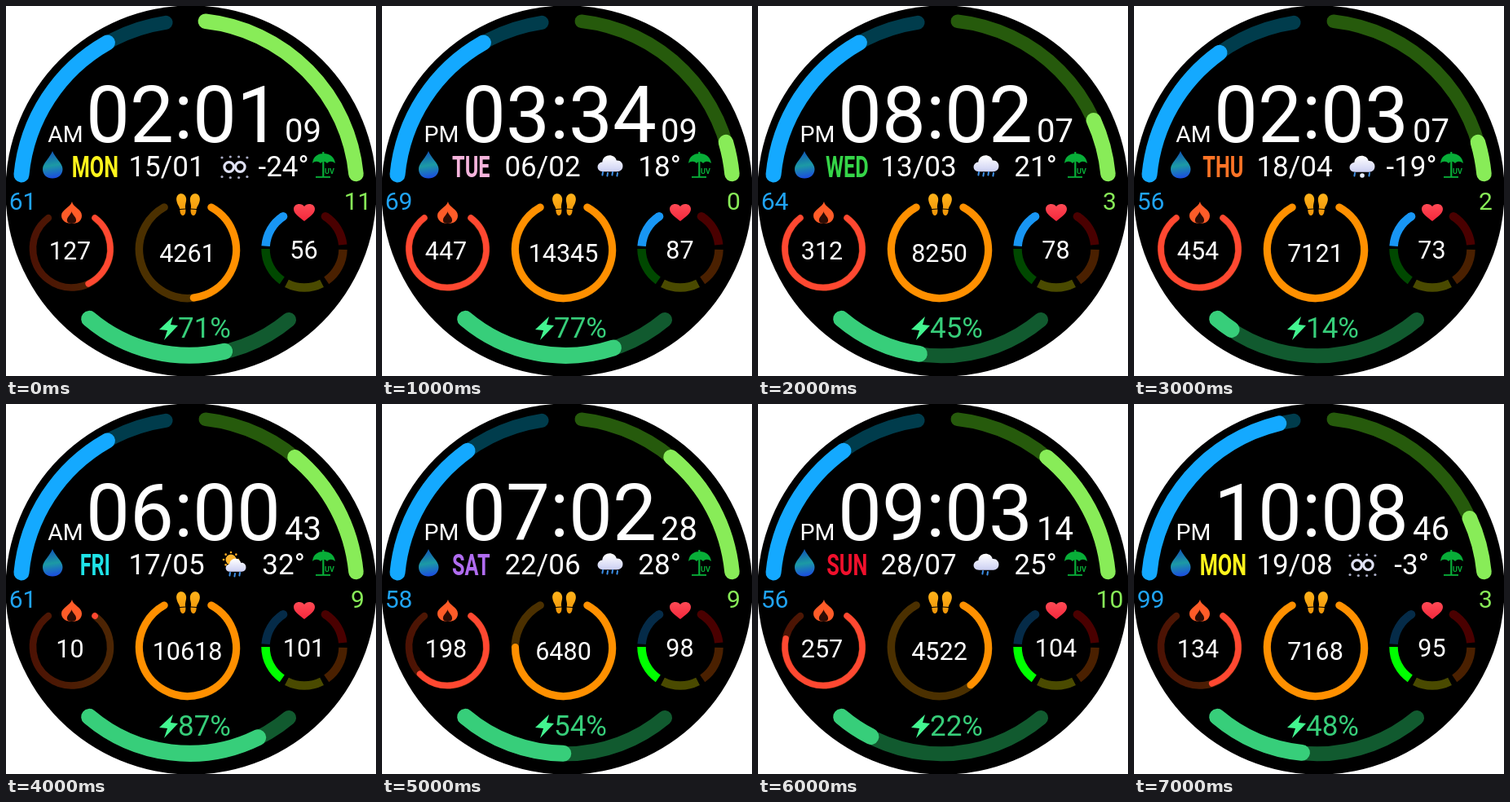
Animation of 454 by 454 pixels, one loop 8000 ms. Source, as an HTML page with a canvas:

```html
<!DOCTYPE html>
<html lang="en">
<head>
<meta charset="utf-8">
<title>Watch face</title>
<style>
html, body { margin: 0; width: 100%; height: 100%; overflow: hidden; background: #fff; }
canvas { display: block; width: 454px; height: 454px; }
</style>
</head>
<body>
<canvas id="face" width="454" height="454"></canvas>
<script>
const ctx = document.getElementById('face').getContext('2d');
const STEP = 1000;
const DAY_COLORS = {
  MON: '#fff51c', TUE: '#f5b4dc', WED: '#35d548', THU: '#ff7426',
  FRI: '#1fe3e8', SAT: '#b06cf0', SUN: '#f0102c'
};

// Ring values are fractions; the outer side arcs end at an angle in degrees.
const STATES = [
  { half: 'AM', time: '02:01', sec: '09', day: 'MON', date: '15/01', sky: 'haze', temp: '-24°',
    humid: 61, humidEnd: 240.6, uv: 11, uvEnd: -83.6, kcal: 127, kcalPart: .41, steps: 4261, stepPart: .477, pulse: 56, power: 71 },
  { half: 'PM', time: '03:34', sec: '09', day: 'TUE', date: '06/02', sky: 'rain', temp: '18°',
    humid: 69, humidEnd: 240.6, uv: 0, uvEnd: -16.5, kcal: 447, kcalPart: 1, steps: 14345, stepPart: 1, pulse: 87, power: 77 },
  { half: 'PM', time: '08:02', sec: '07', day: 'WED', date: '13/03', sky: 'rain', temp: '21°',
    humid: 64, humidEnd: 240.6, uv: 3, uvEnd: -24.4, kcal: 312, kcalPart: 1, steps: 8250, stepPart: 1, pulse: 78, power: 45 },
  { half: 'AM', time: '02:03', sec: '07', day: 'THU', date: '18/04', sky: 'sleet', temp: '-19°',
    humid: 56, humidEnd: 234.3, uv: 2, uvEnd: -16.5, kcal: 454, kcalPart: 1, steps: 7121, stepPart: 1, pulse: 73, power: 14 },
  { half: 'AM', time: '06:00', sec: '43', day: 'FRI', date: '17/05', sky: 'sun', temp: '32°',
    humid: 61, humidEnd: 240.6, uv: 9, uvEnd: -50.5, kcal: 10, kcalPart: 0, steps: 10618, stepPart: 1, pulse: 101, power: 87 },
  { half: 'PM', time: '07:02', sec: '28', day: 'SAT', date: '22/06', sky: 'rain', temp: '28°',
    humid: 58, humidEnd: 234.3, uv: 9, uvEnd: -50.5, kcal: 198, kcalPart: .66, steps: 6480, stepPart: .8, pulse: 98, power: 54 },
  { half: 'PM', time: '09:03', sec: '14', day: 'SUN', date: '28/07', sky: 'drops', temp: '25°',
    humid: 56, humidEnd: 234.3, uv: 10, uvEnd: -50.5, kcal: 257, kcalPart: .858, steps: 4522, stepPart: .369, pulse: 104, power: 22 },
  { half: 'PM', time: '10:08', sec: '46', day: 'MON', date: '19/08', sky: 'haze', temp: '-3°',
    humid: 99, humidEnd: 256.4, uv: 3, uvEnd: -24.4, kcal: 134, kcalPart: .435, steps: 7168, stepPart: 1, pulse: 95, power: 48 }
];

const rad = deg => deg * Math.PI / 180;

function arc(x, y, r, from, to, width, color, cap = 'round') {
  ctx.beginPath();
  // A tiny extra sweep keeps zero-length arcs visible as a dot.
  ctx.arc(x, y, r, rad(from), rad(to) + (from === to ? .002 : 0), to < from);
  ctx.lineWidth = width;
  ctx.lineCap = cap;
  ctx.strokeStyle = color;
  ctx.stroke();
}

function dot(x, y, r, color) {
  ctx.beginPath();
  ctx.arc(x, y, r, 0, 2 * Math.PI);
  ctx.fillStyle = color;
  ctx.fill();
}

function shape(path, color) {
  ctx.fillStyle = color;
  ctx.fill(new Path2D(path));
}

function text(str, x, y, size, color = '#fff', align = 'center') {
  ctx.font = `400 ${size}px Roboto, sans-serif`;
  ctx.textAlign = align;
  ctx.fillStyle = color;
  ctx.fillText(str, x, y);
}

function blend(x0, y0, x1, y1, ...colors) {
  const g = ctx.createLinearGradient(x0, y0, x1, y1);
  colors.forEach((c, i) => g.addColorStop(i / (colors.length - 1), c));
  return g;
}

// The colon sits a little higher than the digits' baseline.
function clock(time) {
  const [hours, minutes] = time.split(':');
  text(hours, 206, 167, 96, '#fff', 'right');
  text(':', 217.5, 162, 96);
  text(minutes, 229, 167, 96, '#fff', 'left');
}

function dayName(day) {
  ctx.save();
  ctx.translate(109.3, 210);
  ctx.scale(.7, 1); // condensed face
  ctx.font = '700 36px Roboto, sans-serif';
  ctx.textAlign = 'center';
  ctx.fillStyle = DAY_COLORS[day];
  ctx.fillText(day, 0, 0);
  ctx.restore();
}

function outerArcs(s) {
  arc(227, 227, 209, 185.5, 261.5, 17, '#003c4c');
  arc(227, 227, 209, 185.5, s.humidEnd, 19, '#14a9ff');
  arc(221.5, 226.5, 209, -5.6, -83.6, 16.5, '#265a0c');
  arc(221.5, 226.5, 209, -5.6, s.uvEnd, 18.5, '#88ec58');
  arc(225, 239, 190.3, 130.2, 50.1, 18, '#115a2f');
  arc(225, 238.5, 190.3, 130.2, 135.1 - .82 * s.power, 20, '#37ce7a');
}

function rings(s) {
  arc(80.5, 298, 47.5, -53, 233, 8.5, blend(30, 0, 130, 0, '#4c1204', '#4c2604'));
  arc(80.5, 298, 47.5, -53, -53 + 286 * s.kcalPart, 7.5, '#ff4831');
  arc(223, 299, 59.5, -61, 241, 9.5, '#4b3000');
  arc(223, 299, 59.5, -61, -61 + 302 * s.stepPart, 9, '#ff9000');

  const active = s.pulse < 90 ? 0 : 1;
  const zones = [
    [184, 237, '#052b48', '#1896f4'], [125, 180, '#004800', '#00ff00'],
    [63, 117, '#4a4a00'], [1, 55, '#4a2000'], [-57, -6, '#4a0000']
  ];
  zones.forEach(([from, to, dim, lit], i) => {
    const color = i === active ? lit : dim;
    arc(366, 298, 47.5, from, to, 10.5, color, 'butt');
    const tip = i === 0 ? to : from;
    if (i === 0 || i === 4) dot(366 + 47.5 * Math.cos(rad(tip)), 298 + 47.5 * Math.sin(rad(tip)), 5.2, color);
  });
}

function flame() {
  shape('M81 240 C82 247 93 249 93 257 C93 263 89 267 81 267 C73 267 68 263 68 257 C68 250 79 247 81 240Z', '#ff5c28');
  shape('M80.5 252 C81 256 87 259 86 264 C85 268 76 268 75 264 C74 259 80 256 80.5 252Z', '#2c0c04');
}

function foot(side) {
  ctx.save();
  ctx.translate(223.5, 243);
  ctx.scale(side, 1);
  ctx.rotate(rad(8));
  ctx.fillStyle = blend(0, -13, 0, 13, '#ffb21a', '#f09408');
  ctx.fill(new Path2D('M1.5 -8 C2.5 -16 13 -16 13.5 -7 C13.5 -1 11 1 11 4.5 L4 5 C4.5 0 1 -3 1.5 -8Z M4 6 L11 5.5 C12.5 15 4.5 16 4 6Z'));
  ctx.restore();
}

function heart() {
  shape('M366 264 C359 258 353 255 353 249 C353 242 363 241 366 246 C369 241 379 242 379 249 C379 255 373 258 366 264Z',
    blend(0, 243, 0, 264, '#ff4a55', '#f4283c'));
}

function waterDrop() {
  shape('M57 178 C60 186 69.5 193 69.5 200 C69.5 207 64 211.5 57 211.5 C50 211.5 45 207 45 200 C45 193 54 186 57 178Z',
    blend(55, 180, 60, 211, '#125bb4', '#1c9aa4', '#1b4ce0'));
}

function umbrella() {
  const green = '#08ae38';
  shape('M376 193 C377 184 383 181 390 181 C397 181 403 185 404 193 C400 190 397 190 394 193 C391 190 389 190 386 193 C383 190 379 190 376 193Z', green);
  ctx.fillStyle = green;
  ctx.fillRect(388.2, 179, 2.2, 31);
  ctx.fillRect(380, 209, 18, 1.8);
  ctx.font = '700 9px Roboto, sans-serif';
  ctx.textAlign = 'center';
  ctx.fillText('UV', 397, 206);
}

function bolt() {
  shape('M205 381 L188 397 L198 398 L194 410 L211 392 L202 391Z', '#43f590');
}

function cloud(x, y, k) {
  ctx.save();
  ctx.translate(x, y);
  ctx.scale(k, k);
  ctx.fillStyle = blend(0, -10, 0, 11, '#ffffff', '#c9cdf2');
  ctx.fill(new Path2D('M-9 10 C-18 10 -18 -1 -10 -2 C-9 -13 6 -13 8 -4 C18 -5 19 10 9 10Z'));
  ctx.restore();
}

function drops(list) {
  for (const [x, y] of list) {
    ctx.beginPath();
    ctx.moveTo(x, y);
    ctx.lineTo(x - .6, y + 3.5);
    ctx.lineWidth = 2;
    ctx.lineCap = 'round';
    ctx.strokeStyle = '#3c8fe8';
    ctx.stroke();
  }
}

const skies = {
  haze() {
    for (const x of [273.7, 287.3]) arc(x, 197.5, 5.8, 0, 360, 3.2, '#dfe1f4');
    for (let i = 0; i < 4; i++) {
      const x = 265 + i * 10.3, bend = i % 3 ? 0 : 1;
      dot(x, 185 + bend, 1.6, '#a9acc4');
      dot(x, 210.5 - bend, 1.6, '#a9acc4');
    }
  },
  rain() {
    cloud(280, 193.5, .97);
    drops([[271, 204], [277, 205], [283, 204], [289, 205]]);
  },
  drops() {
    cloud(280, 194, .97);
    drops([[276, 205], [282, 206]]);
  },
  sleet() {
    cloud(280, 194, .97);
    drops([[271, 205], [289, 205]]);
    dot(280, 208, 2.8, '#e8efff');
  },
  sun() {
    for (let a = 0; a < 360; a += 45) dot(276 + 9 * Math.cos(rad(a)), 191 + 9 * Math.sin(rad(a)), 1.3, '#ffad24');
    dot(276, 191, 6.5, '#ffb52e');
    cloud(282, 198, .78);
    drops([[275, 207], [281, 208], [287, 207]]);
  }
};

function draw(s) {
  ctx.fillStyle = '#fff';
  ctx.fillRect(0, 0, 454, 454);
  dot(227, 227, 227.6, '#000');
  outerArcs(s);
  rings(s);

  text(s.half, 73, 167, 28.5);
  clock(s.time);
  text(s.sec, 342, 167, 40, '#fff', 'left');
  dayName(s.day);
  text(s.date, 197, 209, 35);
  text(s.temp, 340.5, 209, 35);
  text(s.humid, 20.5, 250, 30, '#20a4f4');
  text(s.uv, 431.5, 250, 30, '#88ec58');
  text(s.kcal, 78.5, 311, 30.5);
  text(s.steps, 222.5, 314, 30.5);
  text(s.pulse, 365.5, 310, 30.5);
  text(s.power + '%', 211, 407, 35, '#37ce7a', 'left');

  waterDrop();
  skies[s.sky]();
  umbrella();
  flame();
  foot(-1);
  foot(1);
  heart();
  bolt();
}

const start = performance.now();
function tick() {
  const index = Math.floor((performance.now() - start) / STEP) % STATES.length;
  draw(STATES[index]);
  requestAnimationFrame(tick);
}
tick();
</script>
</body>
</html>
```
